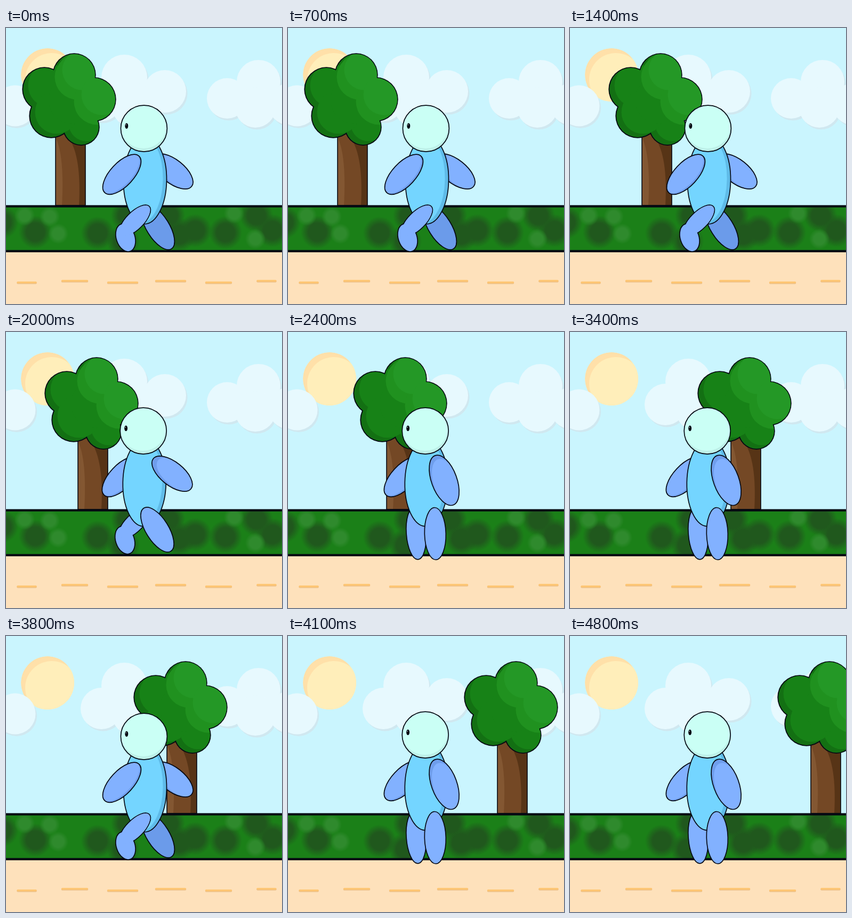
Animation, 518 px wide and 518 px high, one loop 5 s. Source, as an HTML page with a canvas:

```html
<!DOCTYPE html>
<html lang="en">
<head>
<meta charset="utf-8">
<title>Walk in the park</title>
<style>
html, body { margin: 0; width: 100%; height: 100%; overflow: hidden; background: #c9f5fe; }
canvas { display: block; width: 518px; height: 518px; }
</style>
</head>
<body>
<canvas id="stage" width="518" height="518"></canvas>
<script>
const SIZE = 518, LOOP = 5000, INK = '#050812';
const ctx = document.getElementById('stage').getContext('2d');

// Start of each walk cycle in ms, and the tree's [time, shift] jumps
const cycles = [0, 600, 1400, 2100, 2700, 3100, 3800, 4500, 5200];
const treeSteps = [[0, 0], [1400, 42], [2100, 92], [2900, 152], [3200, 209], [3900, 300], [4600, 359]];

function poseAt(t) {
  const i = cycles.findIndex(start => start > t);
  const phase = (t - cycles[i - 1]) / (cycles[i] - cycles[i - 1]);
  return phase < 0.375 ? 'stride' : phase < 0.75 ? 'stand' : 'swap';
}

const treeAt = t => treeSteps.filter(([start]) => start <= t).pop()[1];

function disc(x, y, r, color) {
  ctx.fillStyle = color;
  ctx.beginPath();
  ctx.arc(x, y, r, 0, 2 * Math.PI);
  ctx.fill();
}

function discs(list, color, dx = 0, dy = 0, grow = 0) {
  for (const [x, y, r] of list) disc(x + dx, y + dy, r + grow, color);
}

function clipDiscs(list) {
  ctx.beginPath();
  for (const [x, y, r] of list) {
    ctx.moveTo(x + r, y);
    ctx.arc(x, y, r, 0, 2 * Math.PI);
  }
  ctx.clip();
}

function fillOval([x, y, a, b, deg], color, dx = 0, dy = 0) {
  ctx.beginPath();
  ctx.ellipse(x + dx, y + dy, a, b, deg * Math.PI / 180, 0, 2 * Math.PI);
  ctx.fillStyle = color;
  ctx.fill();
}

// Outlined ellipse; the shade shows where the shifted copy leaves it bare
function oval(o, fill, shade = fill, dx = 0, dy = 0) {
  ctx.save();
  fillOval(o, shade);
  ctx.clip();
  fillOval(o, fill, dx, dy);
  ctx.restore();
  fillOval(o, 'transparent');
  ctx.lineWidth = 1.7;
  ctx.strokeStyle = INK;
  ctx.stroke();
}

const clouds = [
  [[17, 146, 38.5]],
  [[179, 136, 39], [222, 93, 43], [298, 119, 40], [240, 145, 42]],
  [[415, 132, 38], [474, 101, 41], [468, 149, 38], [531, 143, 39]]
];

function sky() {
  ctx.fillStyle = '#caf5fe';
  ctx.fillRect(0, 0, SIZE, SIZE);
  ctx.save();
  clipDiscs([[78, 88, 50]]);
  disc(78, 88, 50, '#ffe0a9');
  disc(86, 97, 50, '#ffeeba');
  ctx.restore();
  for (const cloud of clouds) {
    discs(cloud, '#d0e8f0', 3, 4, -0.5);
    discs(cloud, '#e7f9fe');
  }
}

const crown = [[72, 115, 40.5], [128, 88, 39.5], [165, 134, 40.5], [141, 186, 33.5], [85, 165, 40.5]];

function barkPatch(color, edge, topX, bendX, footX) {
  ctx.fillStyle = color;
  ctx.beginPath();
  ctx.moveTo(topX, 205);
  ctx.quadraticCurveTo(bendX, 240, footX, 333);
  ctx.lineTo(edge, 333);
  ctx.lineTo(edge, 205);
  ctx.fill();
}

function tree(dx) {
  ctx.save();
  ctx.translate(dx, 0);
  ctx.fillStyle = '#744825';
  ctx.fillRect(93, 195, 56, 138);
  barkPatch('#835732', 93, 93, 110, 105);
  barkPatch('#573416', 149, 117, 142, 137);
  ctx.strokeStyle = INK;
  ctx.lineWidth = 1.6;
  ctx.strokeRect(93, 195, 56, 138);

  discs(crown, INK, 0, 0, 1.2);
  clipDiscs(crown.map(([x, y, r]) => [x, y, r - 0.6]).concat([[118, 140, 40]]));
  disc(118, 140, 100, '#137013');
  discs(crown, '#178217', 10, -7);
  disc(125, 135, 45, '#178217');
  discs(crown.slice(1, 3), '#20911f', 6, 4, 3);
  discs(crown.slice(1, 3), '#249826', 15, -9, -2);
  ctx.restore();
}

const darkLeaves = [[-8, 365], [55, 383], [172, 385], [220, 400], [228, 352], [305, 352], [325, 388],
  [355, 380], [412, 384], [470, 352], [500, 380]];
const lightLeaves = [[98, 386], [35, 352], [82, 354], [428, 348], [468, 396]];

function leaf([x, y], r, rgb) {
  const g = ctx.createRadialGradient(x, y, r * 0.65, x, y, r * 1.2);
  g.addColorStop(0, `rgba(${rgb},1)`);
  g.addColorStop(1, `rgba(${rgb},0)`);
  disc(x, y, r * 1.2, g);
}

function hedge() {
  ctx.fillStyle = '#1b8018';
  ctx.fillRect(0, 333, SIZE, 87);
  ctx.save();
  ctx.beginPath();
  ctx.rect(0, 333, SIZE, 87);
  ctx.clip();
  for (const p of darkLeaves) leaf(p, 26, '32,88,29');
  for (const p of lightLeaves) leaf(p, 16, '47,138,45');
  ctx.restore();
}

function road() {
  ctx.fillStyle = '#fee1bb';
  ctx.fillRect(0, 419, SIZE, 99);
  ctx.fillStyle = INK;
  for (const y of [332.5, 416.7]) ctx.fillRect(0, y, SIZE, 4.2);
  ctx.lineCap = 'round';
  ctx.lineWidth = 3.4;
  for (let i = 0; i < 6; i++) {
    const x = 39 + 90 * i, half = 17 + 11 * Math.sin(Math.PI * i / 5), y = 476 + 1.5 * (-1) ** i;
    for (const [dy, color] of [[1.3, '#e9bd88'], [0, '#fdc573']]) {
      ctx.strokeStyle = color;
      ctx.beginPath();
      ctx.moveTo(x - half, y + dy);
      ctx.lineTo(x + half, y + dy);
      ctx.stroke();
    }
  }
}

const BLUE = '#82b1ff', SHADE = '#6f9eec';

function bentLeg() {
  const thigh = [242, 361.5, 38, 16.5, -45], calf = [224.5, 393.5, 27, 17.5, 72];
  oval(thigh, BLUE);
  oval(calf, BLUE);
  const [x, y, a, b, deg] = thigh;
  fillOval([x, y, a - 0.8, b - 0.8, deg], BLUE);
}

const armLeft = () => oval([217.5, 274.8, 47, 22, -47], BLUE, SHADE, -3, -2);
const armRight = () => oval([313, 269, 45.3, 22, 38.5], BLUE, SHADE, 9, 3);
const armDown = () => oval([294.3, 281.3, 49.4, 23.8, 70], BLUE, SHADE, 5, 7);
const legRight = (fill = BLUE) => oval([285.2, 374, 47.8, 21.3, 58], fill);
const legBack = () => oval([241.8, 380.5, 49.5, 18.5, 86], BLUE);
const legFront = () => oval([277.5, 381.5, 49, 20, 88.5], BLUE);

const limbs = {
  stride: { back: [armRight, () => legRight('#6b9bea')], front: [bentLeg, armLeft] },
  swap: { back: [armLeft, bentLeg], front: [legRight, armRight] },
  stand: { back: [armLeft, legBack], front: [legFront, armDown] }
};

function walker(pose) {
  const { back, front } = limbs[pose];
  ctx.save();
  if (pose !== 'stride') ctx.translate(-1.2, -3);
  back.forEach(draw => draw());
  oval([261, 286, 82, 40.5, 91], '#74d5ff', '#5fbbe8', -7, -2);
  front.forEach(draw => draw());
  oval([258.9, 188.6, 43.5, 43.5, 0], '#cafff5', '#bdf0e8', -1, -6);
  fillOval([226.3, 183.8, 3, 5.2, 0], INK);
  disc(225.4, 181.8, 0.8, '#dffaf6');
  ctx.restore();
}

function draw(t) {
  sky();
  tree(treeAt(t));
  hedge();
  road();
  walker(poseAt(t));
}

const start = performance.now();
function tick() {
  draw((performance.now() - start) % LOOP);
  requestAnimationFrame(tick);
}
tick();
</script>
</body>
</html>
```
